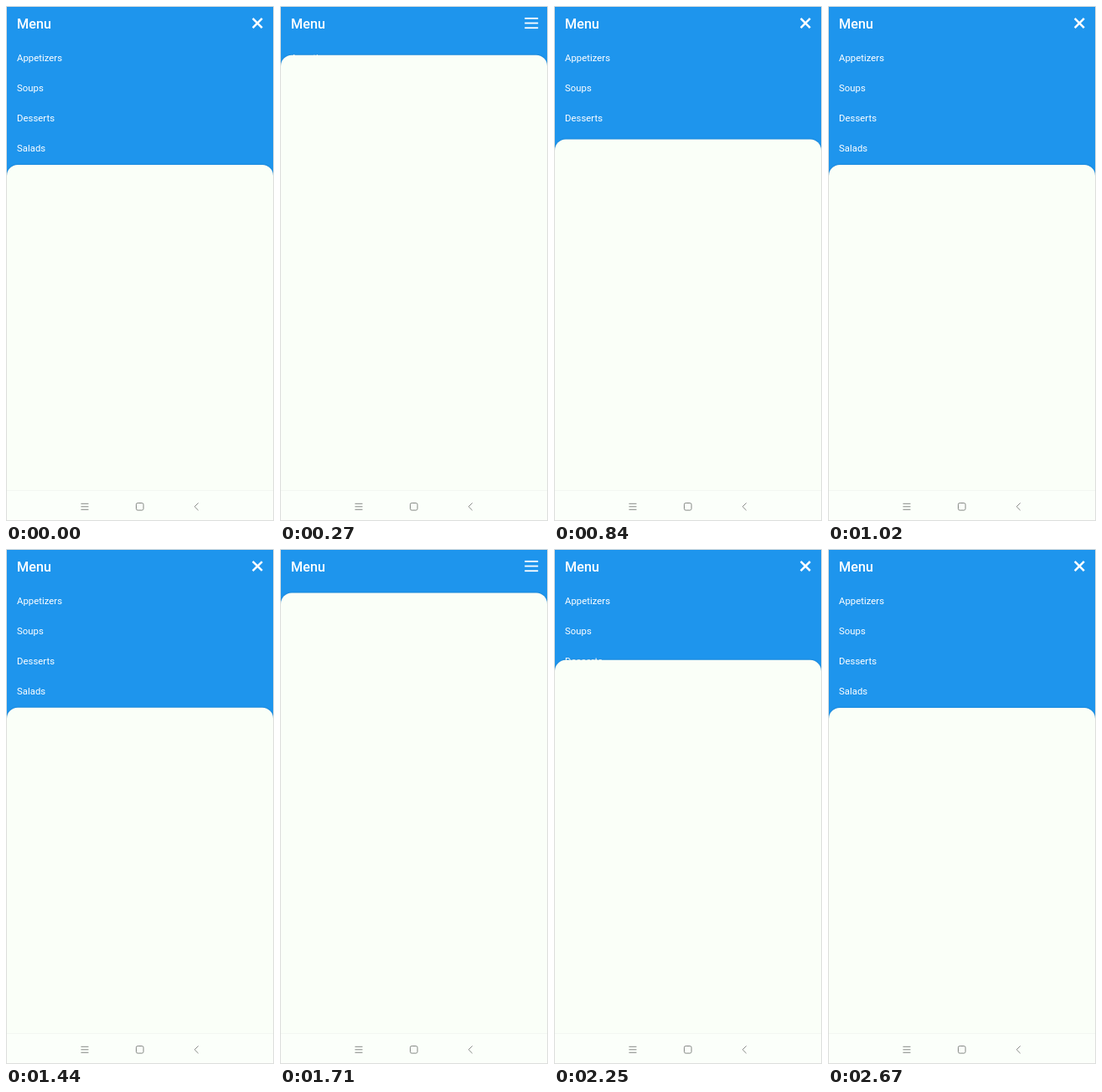
These frames come from a looping animation (320x616 px, 2700 ms). An HTML page with a canvas:

```html
<!DOCTYPE html>
<html lang="en">
<head>
<meta charset="utf-8">
<title>Menu backdrop</title>
<style>
  html, body { margin: 0; width: 100%; height: 100%; overflow: hidden; background: #fafff8; }
  canvas { display: block; width: 320px; height: 616px; }
</style>
</head>
<body>
<canvas id="stage"></canvas>
<script>
const W = 320, H = 616, LOOP = 2700;
const OPEN_TOP = 190, CLOSED_TOP = 44, SLIDE = 400, MORPH = 180;
const BLUE = '#1e95ed', PAPER = '#fafff8';
const ITEMS = ['Appetizers', 'Soups', 'Desserts', 'Salads'];
// Each tap toggles the panel: start time and the state it leads to.
const TAPS = [[18, 0], [636, 1], [1428, 0], [2092, 1]];

const canvas = document.getElementById('stage');
const ctx = canvas.getContext('2d');
const ratio = window.devicePixelRatio || 1;
canvas.width = W * ratio;
canvas.height = H * ratio;

const clamp = v => Math.min(1, Math.max(0, v));
const mix = (a, b, p) => a + (b - a) * p;

// cubic-bezier(0.4, 0, 0.2, 1)
function ease(x) {
  let lo = 0, hi = 1;
  for (let i = 0; i < 24; i++) {
    const s = (lo + hi) / 2, r = 1 - s;
    if (1.2 * s * r * r + 0.6 * s * s * r + s * s * s < x) lo = s;
    else hi = s;
  }
  return lo * lo * (3 - 2 * lo);
}

function openness(t, duration) {
  let value = 1;
  for (const [start, goal] of TAPS) {
    if (t >= start) value = mix(1 - goal, goal, ease(clamp((t - start) / duration)));
  }
  return value;
}

function label(text, x, y, font) {
  ctx.font = font + ' Roboto, sans-serif';
  ctx.fillStyle = '#fff';
  ctx.fillText(text, x, y);
}

function stroke(points, color, width) {
  ctx.beginPath();
  points.forEach(([x, y]) => ctx.lineTo(x, y));
  ctx.strokeStyle = color;
  ctx.lineWidth = width;
  ctx.stroke();
}

// Outer bars turn into the cross while the middle one fades.
function toggleIcon(p) {
  const half = mix(8, 7.9, p), width = mix(1.8, 2.5, p);
  for (const side of [-1, 1]) {
    ctx.save();
    ctx.translate(300.2, 20.5 + side * mix(5.7, 0, p));
    ctx.rotate(-side * p * Math.PI / 4);
    stroke([[-half, 0], [half, 0]], '#fff', width);
    ctx.restore();
  }
  ctx.globalAlpha = 1 - p;
  stroke([[292.2, 20.5], [308.2, 20.5]], '#fff', 1.8);
  ctx.globalAlpha = 1;
}

function panel(top) {
  ctx.save();
  ctx.shadowColor = 'rgba(0, 30, 60, 0.25)';
  ctx.shadowBlur = 2 * ratio;
  ctx.fillStyle = PAPER;
  ctx.beginPath();
  ctx.roundRect(1, top, W - 2, H - top, [13, 13, 0, 0]);
  ctx.fill();
  ctx.restore();
}

function navBar() {
  const grey = '#858885';
  ctx.fillStyle = '#fbfffa';
  ctx.fillRect(1, 580, W - 2, 35);
  ctx.fillStyle = '#f3f7f2';
  ctx.fillRect(1, 579, W - 2, 1);
  for (const y of [595.3, 598.8, 602.3]) stroke([[89.5, y], [98.5, y]], grey, 1);
  ctx.beginPath();
  ctx.roundRect(155.5, 594.5, 8.6, 8.6, 1.8);
  ctx.stroke();
  stroke([[229.6, 594.4], [225.2, 598.8], [229.6, 603.2]], grey, 1);
}

function draw(t) {
  ctx.setTransform(ratio, 0, 0, ratio, 0, 0);
  ctx.fillStyle = BLUE;
  ctx.fillRect(0, 0, W, H);
  label('Menu', 13, 27, '500 16.3px');
  toggleIcon(openness(t, MORPH));
  ITEMS.forEach((item, i) => label(item, 13, 65.7 + 36 * i, '400 11.4px'));
  panel(mix(CLOSED_TOP, OPEN_TOP, openness(t, SLIDE)));
  navBar();
  ctx.strokeStyle = '#dcdedc';
  ctx.lineWidth = 1;
  ctx.strokeRect(0.5, 0.5, W - 1, H - 1);
}

const begin = performance.now();
function tick() {
  draw((performance.now() - begin) % LOOP);
  requestAnimationFrame(tick);
}
tick();
</script>
</body>
</html>
```
